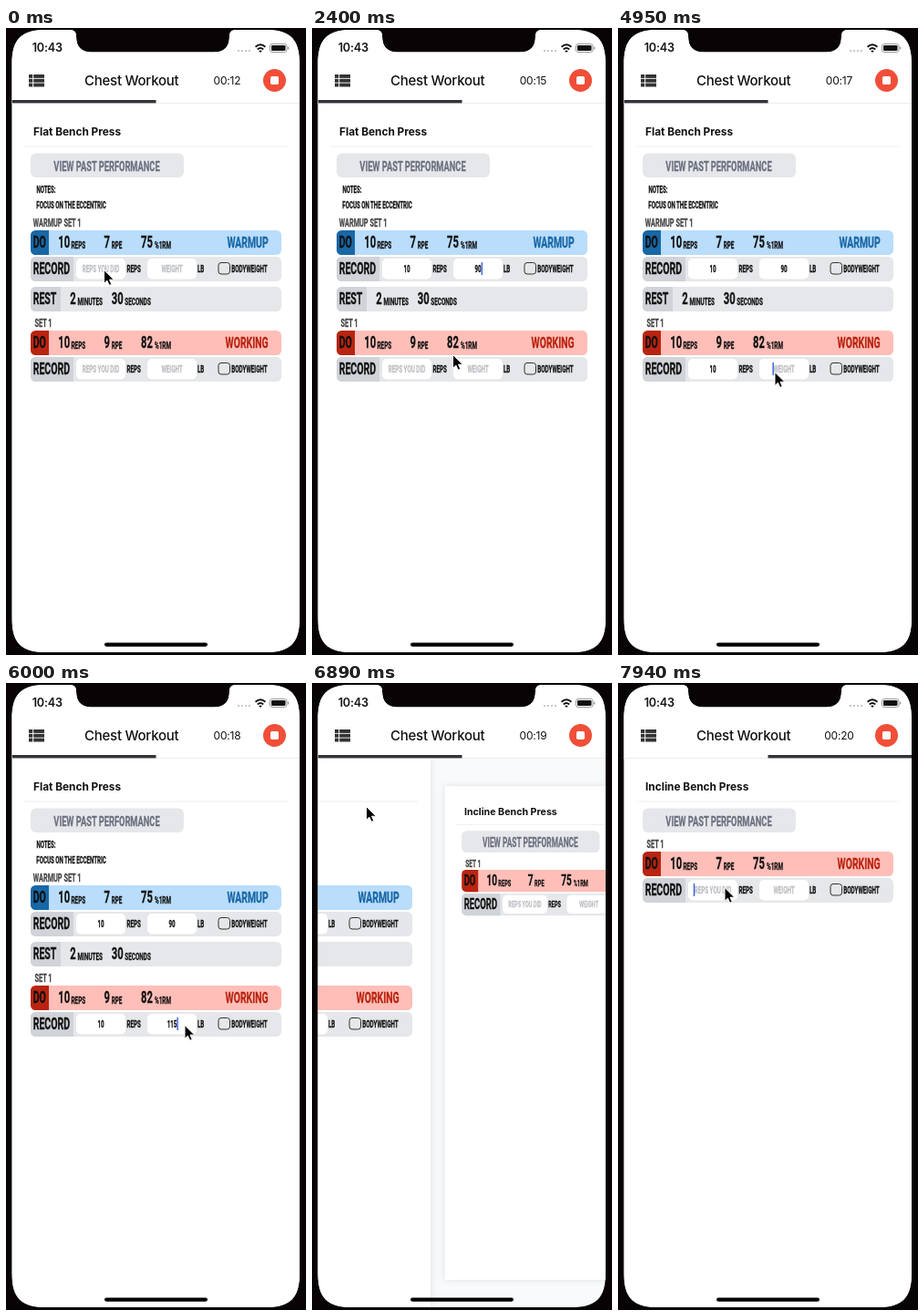
An HTML page that plays this animation: 329x688 px, repeating every 8000 ms.

```html
<!DOCTYPE html>
<html lang="en">
<head>
<meta charset="utf-8">
<title>Workout tracker</title>
<style>
  html, body { margin: 0; width: 100%; height: 100%; overflow: hidden; background: #080405; }
  svg { display: block; width: 329px; height: 688px; }
  text { font-family: Inter, sans-serif; white-space: pre; }
  .narrow { font-family: Roboto, sans-serif; font-weight: 700; fill: currentColor; stroke: currentColor; stroke-width: .3px; }
  .page { filter: drop-shadow(0 0 4px rgba(40, 55, 75, .14)); }
</style>
</head>
<body>
<svg id="stage" viewBox="0 0 329 688"></svg>
<script>
const LOOP = 8000, STEP = 150;
const NARROW = 0.6;               // one width for the whole condensed face
const PAGE_WIDTH = 315.5, CENTER_X = 164.25, CENTER_Y = 384;
const INK = '#111', GREY = '#e5e7ea', DARK_GREY = '#d0d3d8', HINT = '#bcbec2';
const BLUE = { light: '#b9ddfb', dark: '#1867a6', name: 'WARMUP' };
const RED = { light: '#ffbeb8', dark: '#b92410', name: 'WORKING' };

const rect = (x, y, w, h, fill, r = 0, extra = '') =>
  `<rect x="${x}" y="${y}" width="${w}" height="${h}" rx="${r}" fill="${fill}" ${extra}/>`;

const narrow = (x, y, size, str, color = INK, anchor = 'start') =>
  `<text class="narrow" transform="translate(${x} ${y}) scale(${NARROW} 1)" font-size="${size}"
    color="${color}" text-anchor="${anchor}">${str}</text>`;

const plain = (x, y, size, weight, str, extra = '') =>
  `<text x="${x}" y="${y}" font-size="${size}" font-weight="${weight}" fill="${INK}" ${extra}>${str}</text>`;

// A rounded row with a darker label block at its left end
const bar = (y, fill, labelFill, labelWidth, label) =>
  rect(27, y, 275, 27, fill, 5.5) +
  `<path d="M${27 + labelWidth} ${y}v27h${5.5 - labelWidth}a5.5 5.5 0 0 1-5.5-5.5v-16a5.5 5.5 0 0 1 5.5-5.5z" fill="${labelFill}"/>` +
  narrow(29.7, y + 19.3, 17.6, label);

const amount = (x, unitX, y, number, unit) =>
  narrow(x, y + 19.3, 18.7, number) + narrow(unitX, y + 20, 10.6, unit);

const field = (x, y, hint) =>
  rect(x, y + 2, 54, 22.5, '#fff', 5) +
  `<g class="field" data-hint="${hint}" transform="translate(${x + 27} ${y + 17})">` +
  narrow(0, 0, 10.4, hint, HINT, 'middle') +
  rect(0, -11, 1.5, 14, '#4169e1', 0, 'visibility="hidden"') + '</g>';

const workoutSet = (y, label, labelX, theme, reps, effort, load) =>
  narrow(labelX, y - 3.7, 12.2, label, '#444') +
  bar(y, theme.light, theme.dark, 20, 'DO') +
  amount(57.3, 71.5, y, reps, 'REPS') +
  amount(107.5, 115.7, y, effort, 'RPE') +
  amount(148, 163, y, load, '%1RM') +
  narrow(287.7, y + 19.3, 17.4, theme.name, theme.dark, 'end') +
  bar(y + 29, GREY, DARK_GREY, 47, 'RECORD') +
  field(77, y + 29, 'REPS YOU DID') + narrow(132.5, y + 46, 10.4, 'REPS') +
  field(155, y + 29, 'WEIGHT') + narrow(210, y + 46, 10.4, 'LB') +
  rect(233, y + 35.5, 12.5, 12.5, 'none', 3, 'stroke="#333"') +
  narrow(247.3, y + 46, 10.4, 'BODYWEIGHT');

const page = (title, content) =>
  `<g class="page">${rect(6.5, 83, PAGE_WIDTH, 602, '#fff')}
    ${plain(30, 118, 11.85, 700, title)}
    ${rect(20, 129.5, 289, 1, '#eeeff1')}
    ${rect(27, 137.5, 168, 26.5, GREY, 6)}
    ${narrow(110.5, 157.3, 15.5, 'VIEW PAST PERFORMANCE', '#6b7080', 'middle')}
    ${content}</g>`;

const header =
  rect(0, 0, 329, 83, '#fff') + rect(6, 82, 317, 1, '#ededef') +
  plain(28.7, 26, 12.6, 600, '10:43', 'letter-spacing="-.2"') +
  [255, 259, 263, 267].map(x => `<circle cx="${x}" cy="25" r="1.1" fill="#bbb"/>`).join('') +
  `<g fill="none" stroke="#111" stroke-width="2">
    <path d="M273.6 20.8Q279 15.8 284.4 20.8M275.8 23.4Q279 20.6 282.2 23.4"/></g>
  <path d="M277.2 25.2Q279 23.8 280.8 25.2L279 27z" fill="#111"/>` +
  rect(289.5, 17.5, 18.5, 9, 'none', 2.5, 'stroke="#999"') +
  rect(291, 19, 15.5, 6, '#111', 1.2) + rect(309, 20.5, 1.3, 3, '#999', .6) +
  [51, 55.8, 60.6].map(y => rect(25, y, 4.2, 3.9, '#333') + rect(30.2, y, 11.8, 3.9, '#333')).join('') +
  plain(137.7, 63, 15, 500, 'Chest Workout', 'text-anchor="middle" letter-spacing="-.25"') +
  plain(242.5, 62, 12, 400, '', 'id="timer" text-anchor="middle" letter-spacing="-.2"') +
  '<circle cx="294.5" cy="57.5" r="12.5" fill="#f04e38"/>' + rect(290, 53, 9, 9, '#fff', 1.8) +
  rect(6.5, 79, 158, 3.4, '#333338', 0, 'id="progress"');

const stage = document.getElementById('stage');
stage.innerHTML =
  `<clipPath id="screen"><path d="M44 2H70q7 0 7 7q0 17.5 17 17.5H228q17 0 17-17.5q0-7 7-7H284.5C312 2 322 12 322 40V647C322 675 312 685 284.5 685H44C16.500 685 6.500 675 6.500 647V40C6.500 12 16.500 2 44 2z"/></clipPath>
  <g clip-path="url(#screen)">${rect(0, 0, 329, 688, '#f9fafb')}` +
  page('Incline Bench Press', workoutSet(185, 'SET 1', 31.5, RED, 10, 7, 75)) +
  page('Flat Bench Press',
    narrow(33.5, 180.5, 10.2, 'NOTES:') + narrow(33.3, 197.5, 10.2, 'FOCUS ON THE ECCENTRIC') +
    workoutSet(222, 'WARMUP SET 1', 29.8, BLUE, 10, 7, 75) +
    bar(284, GREY, DARK_GREY, 33, 'REST') +
    amount(70.3, 78.5, 284, 2, 'MINUTES') + amount(115.7, 130.3, 284, 30, 'SECONDS') +
    workoutSet(332, 'SET 1', 31.5, RED, 10, 9, 82)) +
  header + rect(108, 674.5, 113, 4.2, '#000', 2.1) +
  `</g><path id="cursor" d="M0 .5V15.3L3.400 12.200 5.700 17.300 8.300 16.200 6 11.200H10.800z" fill="#000" stroke="#fff"/>`;

const [nextPage, firstPage] = stage.querySelectorAll('.page');
const fields = [...firstPage.querySelectorAll('.field'), ...nextPage.querySelectorAll('.field')];
const timer = document.getElementById('timer');
const progress = document.getElementById('progress');
const cursor = document.getElementById('cursor');

// [time, field, text]: an empty text is the click that focuses the field
const inputs = [
  [300, 0, ''], [900, 0, '1'], [1050, 0, '10'],
  [1800, 1, ''], [1950, 1, '9'], [2100, 1, '90'],
  [2850, 2, ''], [3300, 2, '1'], [3450, 2, '10'],
  [4950, 3, ''], [5400, 3, '1'], [5550, 3, '11'], [5700, 3, '115'],
  [7940, 4, '']
];

const cursorPath = [
  [0, 107.5, 265], [1200, 107.5, 265], [1650, 172, 266], [2250, 172, 266], [2400, 154.5, 358],
  [2550, 116, 386], [2700, 104, 394], [2850, 102, 378], [3450, 102, 378], [3600, 128.5, 376],
  [3750, 148, 377], [3900, 148, 377], [4200, 172, 378], [5850, 172, 376], [6000, 196, 375],
  [6300, 244, 215], [6450, 254, 150], [6600, 252, 137], [6750, 170, 134], [6890, 59.5, 135],
  [7040, 56, 155], [7190, 84, 187.5], [7340, 107, 212], [7490, 114, 220], [7790, 115, 222], [7940, 117, 224]
];
const dragPath = [[6600, 0], [6750, 82], [6890, 192], [7040, 287], [7190, PAGE_WIDTH]];
const growPath = [[6890, 0.9], [7040, 0.925], [7190, 0.976], [7340, 0.997], [7490, 1]];

function along(path, t) {
  const next = path.findIndex(key => key[0] > t);
  if (next === 0) return path[0].slice(1);
  if (next < 0) return path.at(-1).slice(1);
  const [a, b] = [path[next - 1], path[next]];
  const k = (t - a[0]) / (b[0] - a[0]);
  return a.slice(1).map((v, i) => v + (b[i + 1] - v) * k);
}

function place(el, x, scale) {
  el.setAttribute('transform',
    `translate(${CENTER_X + x} ${CENTER_Y}) scale(${scale}) translate(${-CENTER_X} ${-CENTER_Y})`);
}

function drawFields(t) {
  const done = inputs.filter(input => input[0] <= t);
  const values = [];
  for (const [, i, text] of done) values[i] = text;
  const [since, focused] = done.at(-1) || [0, -1];
  const caretOn = (t - since) % 1000 < 500;
  fields.forEach((group, i) => {
    const [label, caret] = group.children;
    label.textContent = values[i] || group.dataset.hint;
    label.setAttribute('color', values[i] ? INK : HINT);
    const half = label.getComputedTextLength() * NARROW / 2;
    caret.setAttribute('x', values[i] ? half : -half - 1);
    caret.setAttribute('visibility', i === focused && caretOn ? 'visible' : 'hidden');
  });
}

function hold(t) {
  const start = t < 6890 ? 0 : 6890;
  return start + Math.floor((t - start) / STEP) * STEP;
}

function draw(t) {
  const [drag] = along(dragPath, t), [grow] = along(growPath, t);
  place(firstPage, -drag, 1.9 - grow);
  place(nextPage, PAGE_WIDTH - drag, grow);
  progress.setAttribute('x', t < 7040 ? 6.5 : 164.5);
  timer.textContent = '00:' + (12 + Math.floor((t + 620) / 1000));
  cursor.setAttribute('transform', `translate(${along(cursorPath, t)})`);
  drawFields(t);
}

function frame() {
  draw(hold(performance.now() % LOOP));
  requestAnimationFrame(frame);
}
frame();
</script>
</body>
</html>
```
